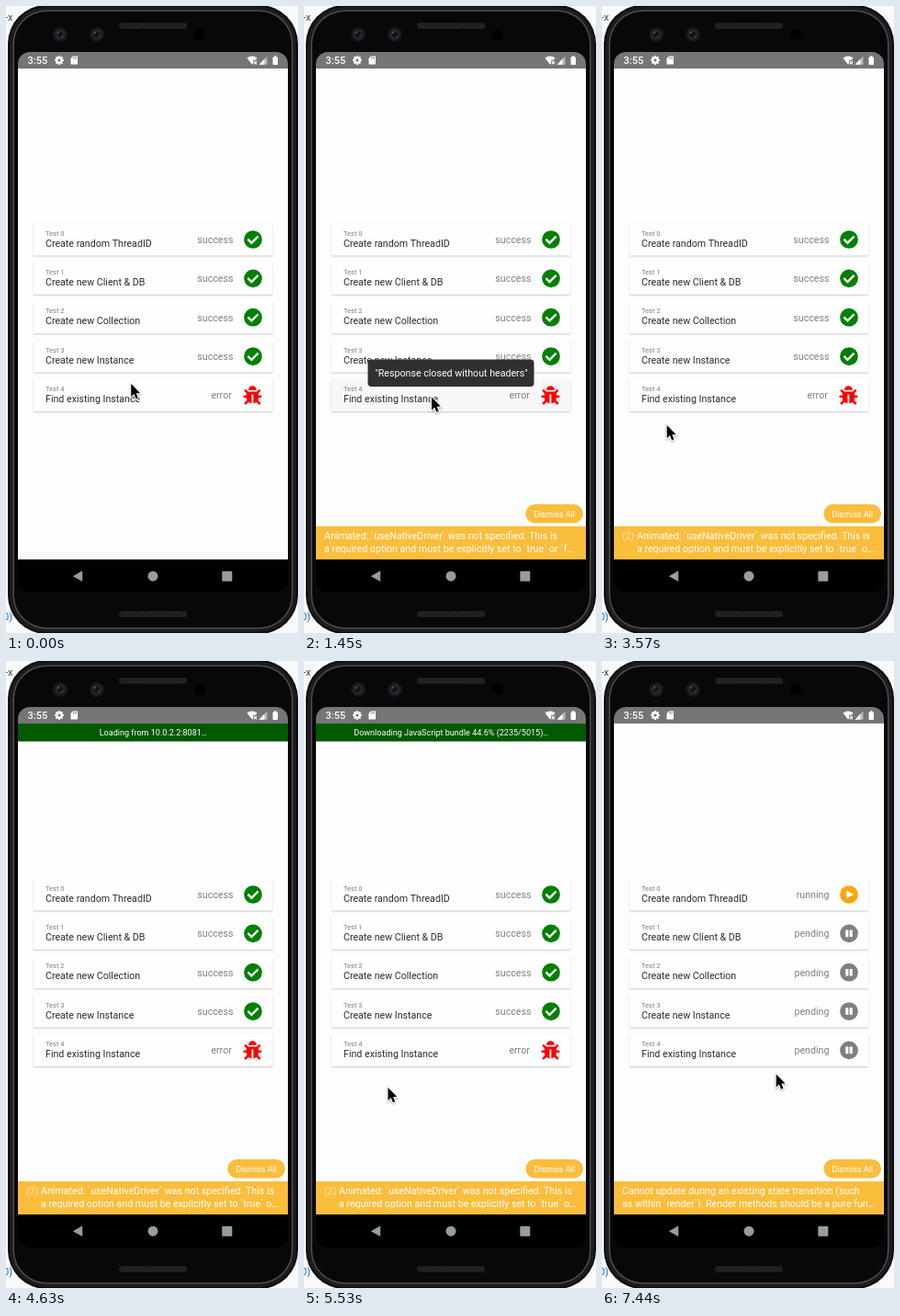
An HTML page with a canvas for the animation above (8000 ms loop, 318 by 682 pixels).

```html
<!DOCTYPE html>
<html lang="en">
<head>
<meta charset="utf-8">
<title>Test runner on a phone</title>
<style>
  html, body { margin: 0; width: 100%; height: 100%; overflow: hidden; background: #f8f9fb; }
  canvas { display: block; width: 318px; height: 682px; }
</style>
</head>
<body>
<canvas id="stage"></canvas>
<script>
const W = 318, H = 682, LOOP = 8000;
const canvas = document.getElementById('stage');
const ctx = canvas.getContext('2d');
const dpr = window.devicePixelRatio || 1;
canvas.width = W * dpr;
canvas.height = H * dpr;

const YELLOW = '#fabd3c';
const BODY = 10.65, SMALL = 9.05, TINY = 7.5;
const TESTS = ['Create random ThreadID', 'Create new Client & DB', 'Create new Collection',
  'Create new Instance', 'Find existing Instance'];

// Pointer path: time, x, y; off-stage points hide it
const PATH = [
  [0, 136.2, 411], [60, 136.2, 411], [60, 134.2, 407], [530, 134.2, 407],
  [680, 148.5, 395], [950, 139, 425.5], [1630, 139, 425.5], [1690, 110, 426.5],
  [1830, 110, 426.5], [2130, 70.7, 456], [3595, 70.7, 456], [3660, 330, 512],
  [3840, 330, 521], [3935, 40, 540], [3940, -60, 540], [5150, -60, 496],
  [5150, 4, 494], [5420, 91.5, 464], [5560, 91.5, 464], [6190, 189.7, 449.5], [LOOP, 189.7, 449.5]
];

const clamp = v => Math.max(0, Math.min(1, v));
const ramp = (t, a, b) => clamp((t - a) / (b - a));

function box(x, y, w, h, color, r = 0) {
  ctx.fillStyle = color;
  ctx.beginPath();
  ctx.roundRect(x, y, w, h, r);
  ctx.fill();
}

function disc(x, y, r, color) {
  ctx.fillStyle = color;
  ctx.beginPath();
  ctx.arc(x, y, r, 0, Math.PI * 2);
  ctx.fill();
}

function trace(pts, close) {
  ctx.beginPath();
  pts.forEach(([x, y], i) => i ? ctx.lineTo(x, y) : ctx.moveTo(x, y));
  if (close) ctx.closePath();
}

function poly(pts, color) {
  ctx.fillStyle = color;
  trace(pts, true);
  ctx.fill();
}

function line(pts, color, width, cap = 'butt') {
  ctx.strokeStyle = color;
  ctx.lineWidth = width;
  ctx.lineCap = cap;
  trace(pts);
  ctx.stroke();
}

function text(str, x, y, size, color, align = 'left', weight = 400) {
  ctx.font = `${weight} ${size}px Roboto, sans-serif`;
  ctx.textAlign = align;
  ctx.fillStyle = color;
  ctx.fillText(str, x, y);
}

function speaker(y) {
  box(123, y, 74, 7, '#1d1d1d', 3);
  for (let i = 0; i < 24; i++) {
    for (let j = 0; j < 2; j++) box(125 + i * 3 + j * 1.5, y + 1.5 + j * 2.5, 1.3, 1.3, '#303030');
  }
}

function lens(x) {
  disc(x, 31, 8, '#17181b');
  disc(x, 31, 5.5, '#25272c');
  disc(x, 31, 3, '#101116');
  disc(x - 2, 29, 1.2, '#4b4e57');
  disc(x + 2, 33, 1, '#3c3e46');
}

// Nested rounded plates, each inset from the phone's outer edge
function plate(inset, color) {
  box(2 + inset, inset - 1, 316 - inset * 2, 684 - inset * 2, color, 42 - inset);
}

function phone() {
  ctx.fillStyle = '#f8f9fb';
  ctx.fillRect(0, 0, W, H);
  text('-x', -1, 16, 11, '#444');
  text('0)', -3, 668, 11, '#1766c0');
  plate(0, '#0c0c0c');
  plate(2, '#1c1c1c');
  plate(5.5, '#4c4c4c');
  plate(7, '#080808');
  speaker(18);
  speaker(658);
  lens(59);
  lens(99);
  disc(211, 31, 6, '#000');
  box(13, 50, 294, 588, '#000', 14);
}

function statusBar() {
  box(13, 50, 294, 18, '#757575', [13, 13, 0, 0]);
  text('3:55', 23.5, 63, 11, '#fff', 'left', 500);

  for (let i = 0; i < 4; i++) {
    const a = i * Math.PI / 4, c = Math.cos(a) * 4.9, s = Math.sin(a) * 4.9;
    line([[58 - c, 59 - s], [58 + c, 59 + s]], '#fff', 2);
  }
  disc(58, 59, 3.7, '#fff');
  disc(58, 59, 1.6, '#757575');

  poly([[73, 54.5], [78, 54.5], [78, 63.5], [70.5, 63.5], [70.5, 57]], '#fff');
  for (let i = 0; i < 3; i++) box(73 + i * 1.6, 55.6, 0.8, 2, '#757575');

  ctx.fillStyle = '#fff';
  ctx.beginPath();
  ctx.moveTo(268, 63.8);
  ctx.lineTo(262.5, 56.6);
  ctx.quadraticCurveTo(268, 52.5, 273.5, 56.6);
  ctx.fill();
  box(269, 58.8, 5, 5.4, '#757575');
  line([[269.8, 59.8], [273, 63.4]], '#fff', 1.1);
  line([[273, 59.8], [269.8, 63.4]], '#fff', 1.1);

  poly([[284.5, 54.5], [284.5, 63.8], [275.5, 63.8]], '#b5b5b5');
  poly([[281.5, 57.6], [281.5, 63.8], [275.5, 63.8]], '#fff');
  box(290.5, 55.5, 5.5, 8.5, '#fff', 0.8);
  box(292, 54.3, 2.5, 2, '#fff');
}

function navBar() {
  const gray = '#9b9b9b';
  poly([[72.8, 620.2], [83.2, 614.3], [83.2, 626.1]], gray);
  disc(160, 620.2, 5.5, gray);
  box(235.3, 614.7, 11, 11, gray, 1);
}

// Icons use a 512-unit grid
const ICONS = {
  success() {
    disc(256, 256, 250, '#008000');
    line([[114, 248], [216, 350], [397, 169]], '#fff', 60);
  },
  running() {
    disc(256, 256, 250, '#ffa500');
    poly([[184, 140], [388, 256], [184, 372]], '#fff');
  },
  pending() {
    disc(256, 256, 250, '#808080');
    box(160, 160, 80, 192, '#fff', 16);
    box(272, 160, 80, 192, '#fff', 16);
  },
  error() {
    const red = '#f00';
    ctx.fillStyle = red;
    ctx.beginPath();
    ctx.arc(256, 112, 112, Math.PI, 0);
    ctx.fill();
    box(88, 160, 336, 320, red, [0, 0, 150, 150]);
    box(232, 224, 48, 258, '#fff', [12, 12, 0, 0]);
    for (const side of [-1, 1]) {
      const x = d => 256 + side * d;
      line([[x(192), 128], [x(126), 194]], red, 64, 'round');
      line([[x(224), 288], [x(150), 288]], red, 64, 'round');
      line([[x(192), 480], [x(116), 404]], red, 64, 'round');
    }
  }
};

function icon(name, x, y) {
  ctx.save();
  ctx.translate(x - 10.1, y - 10.1);
  ctx.scale(20.2 / 512, 20.2 / 512);
  ICONS[name]();
  ctx.restore();
}

function card(i, state, pressed) {
  const y = 236.3 + i * 42.35;
  ctx.save();
  ctx.shadowColor = 'rgba(0,0,0,.2)';
  ctx.shadowBlur = 1.6 * dpr;
  ctx.shadowOffsetY = dpr;
  box(29.8, y, 260.4, 35.2, pressed ? '#f8f8f8' : '#fefefe', 1);
  ctx.restore();
  text('Test ' + i, 43, y + 13.4, TINY, '#7c7c7c');
  text(TESTS[i], 43, y + 25.3, BODY, '#2b2b2b');
  text(state, state === 'error' ? 245.8 : 247.4, y + 21.6, BODY, '#808080', 'right');
  icon(state, state === 'error' ? 268.4 : 269, y + 17.7);
}

function warning(lines, count) {
  box(241.3, 542, 62.7, 20.5, YELLOW, 10.2);
  text('Dismiss All', 272.6, 555.6, SMALL, '#fff', 'center');
  box(13, 566, 294, 36, YELLOW);
  if (count) text(`(${count})`, 22, 580.3, BODY, 'rgba(255,255,255,.55)');
  lines.forEach((s, i) => text(s, count ? 38 : 22, 580.3 + i * 13.5, BODY, '#fff'));
}

function toast(alpha) {
  if (alpha <= 0) return;
  ctx.globalAlpha = alpha;
  box(69.5, 384.5, 181, 29.5, '#303030', 4);
  text('"Response closed without headers"', 160.5, 403.2, BODY, '#fff', 'center');
  ctx.globalAlpha = 1;
}

function loadingBar(t) {
  let msg = 'Loading from 10.0.2.2:8081…';
  if (t >= 4750) {
    const step = Math.floor((t - 5530) / 40) * 40;
    const done = Math.min(5015, Math.round(2235 + step * 2483 / 880));
    msg = `Downloading JavaScript bundle ${(done / 50.15).toFixed(1)}% (${done}/5015)…`;
  }
  box(13, 68, 294, 19.5, '#035900');
  text(msg, 160.3, 81, SMALL, '#fff', 'center');
}

function pointer(t) {
  let i = 1;
  while (i < PATH.length - 1 && PATH[i][0] <= t) i++;
  const [t0, x0, y0] = PATH[i - 1], [t1, x1, y1] = PATH[i];
  const k = ramp(t, t0, t1);
  ctx.save();
  ctx.translate(x0 + (x1 - x0) * k, y0 + (y1 - y0) * k);
  const arrow = [[0, 0], [0, 14], [3.2, 11], [5.4, 16.2], [7.7, 15.2], [5.6, 10.2], [9.8, 10]];
  ctx.save();
  ctx.shadowColor = 'rgba(0,0,0,.35)';
  ctx.shadowBlur = 2 * dpr;
  ctx.shadowOffsetY = dpr;
  trace(arrow, true);
  ctx.lineWidth = 2;
  ctx.strokeStyle = '#fff';
  ctx.stroke();
  ctx.restore();
  poly(arrow, '#000');
  ctx.restore();
}

function draw(t) {
  ctx.setTransform(dpr, 0, 0, dpr, 0, 0);
  phone();
  box(13, 68, 294, 534, '#fdfdfd');
  statusBar();
  navBar();

  const reloaded = t >= 7440;
  if (t < 6540 || reloaded) {
    TESTS.forEach((_, i) => {
      const state = reloaded ? (i ? 'pending' : 'running') : (i < 4 ? 'success' : 'error');
      card(i, state, i === 4 && t >= 1100 && t < 1830);
    });
    if (reloaded) {
      warning(['Cannot update during an existing state transition (such',
        'as within `render`). Render methods should be a pure fun…']);
    } else if (t >= 1240) {
      const again = t >= 1860;
      warning(['Animated: `useNativeDriver` was not specified. This is',
        'a required option and must be explicitly set to `true` o' + (again ? '…' : 'r `f…')], again ? 2 : 0);
    }
  }
  if (t >= 4630 && t < 6540) loadingBar(t);
  toast(Math.min(ramp(t, 1260, 1430), 1 - ramp(t, 2390, 2610)));
  pointer(t);
}

function tick() {
  draw(performance.now() % LOOP);
  requestAnimationFrame(tick);
}
tick();
</script>
</body>
</html>
```
